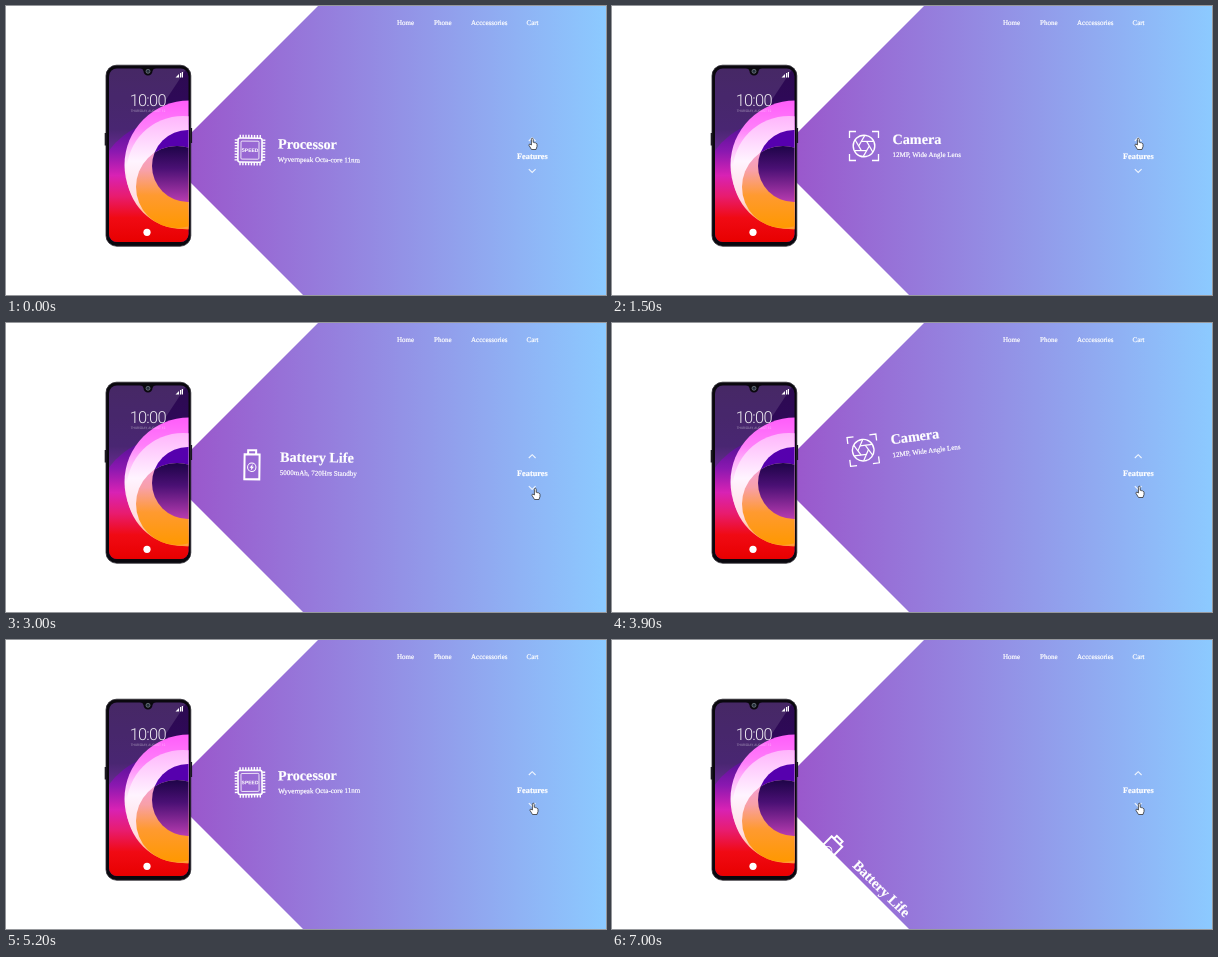
Animation of 600 by 289 pixels, one loop 7.1 s. Source, as an HTML page:

```html
<!DOCTYPE html>
<html lang="en">
<head>
<meta charset="utf-8">
<title>Phone features</title>
<style>
  html, body { margin: 0; width: 100%; height: 100%; overflow: hidden; background: #fff; }
  svg { display: block; width: 600px; height: 289px; }
  text { fill: #fff; stroke: #fff; stroke-width: .2px; font: 7px "Liberation Serif", serif; text-rendering: geometricPrecision; }
  .title { font-size: 14.2px; font-weight: bold; }
  .label { font-size: 8.3px; font-weight: bold; }
  .line { fill: none; stroke: #fff; }
  .clock { font: 300 16.5px Roboto, sans-serif; letter-spacing: -.8px; stroke: none; }
  .tiny { font: 3.3px Roboto, sans-serif; stroke: none; }
  .speed { font: bold 5px "Liberation Sans", sans-serif; stroke: none; }
</style>
</head>
<body>
<svg viewBox="0 0 600 289">
  <defs>
    <linearGradient id="sky" gradientUnits="userSpaceOnUse" x1="160" x2="600" y1="0" y2="0">
      <stop stop-color="#9b51c9"/><stop offset="1" stop-color="#8ccaff"/>
    </linearGradient>
    <linearGradient id="wall" x2="0" y2="1">
      <stop stop-color="#2c0a50"/><stop offset=".35" stop-color="#30085e"/>
      <stop offset=".5" stop-color="#5a0f88"/>
    </linearGradient>
    <linearGradient id="glow" gradientUnits="userSpaceOnUse" x1="0" x2="0" y1="115" y2="236">
      <stop stop-color="#4c0f92"/><stop offset=".25" stop-color="#8a18b0"/>
      <stop offset=".45" stop-color="#d822b4"/><stop offset=".62" stop-color="#e81c70"/>
      <stop offset=".8" stop-color="#f00a14"/><stop offset="1" stop-color="#e80000"/>
    </linearGradient>
    <linearGradient id="outer" x2="0" y2="1">
      <stop stop-color="#ff5cfa"/><stop offset=".22" stop-color="#ff80fa"/>
      <stop offset=".5" stop-color="#fff0fc"/><stop offset=".7" stop-color="#ffd0d8"/>
      <stop offset="1" stop-color="#ff9a30"/>
    </linearGradient>
    <linearGradient id="band" x2="0" y2="1">
      <stop stop-color="#ffb4fc"/><stop offset=".4" stop-color="#fff4ff"/>
      <stop offset=".75" stop-color="#ffdce0"/><stop offset="1" stop-color="#ff9a30"/>
    </linearGradient>
    <linearGradient id="middle" x2="0" y2="1">
      <stop stop-color="#f4a0e0"/><stop offset=".3" stop-color="#f8a0a8"/>
      <stop offset=".6" stop-color="#ff9a30"/><stop offset="1" stop-color="#ff9800"/>
    </linearGradient>
    <linearGradient id="inner" gradientUnits="userSpaceOnUse" x1="0" x2="0" y1="140" y2="196">
      <stop stop-color="#1e0448"/><stop offset=".4" stop-color="#4a1074"/>
      <stop offset="1" stop-color="#b83cb0"/>
    </linearGradient>
    <clipPath id="screen"><rect x="103" y="62.5" width="79.5" height="173.5" rx="8"/></clipPath>
    <clipPath id="overlap"><circle cx="171" cy="181" r="41"/></clipPath>
  </defs>

  <path d="M312 0H600V289H297L160 152Z" fill="url(#sky)"/>
  <text x="391" y="19.3">Home</text>
  <text x="428" y="19.3">Phone</text>
  <text x="465" y="19.3">Acccessories</text>
  <text x="520.5" y="19.3">Cart</text>

  <g id="wheel">
    <g>
      <g class="line">
        <rect x="232" y="131.3" width="24" height="24" rx="2" stroke-width="1.6"/>
        <rect x="235" y="134.3" width="18" height="18" rx="1" stroke-width=".8"/>
        <path d="M233.5 129.5H255M233.5 157H255M230.2 132.5V154M257.8 132.5V154" stroke-width="3" stroke-dasharray="1.4 1.45"/>
      </g>
      <text class="speed" x="244" y="145.1" text-anchor="middle">SPEED</text>
      <text class="title" x="272" y="141.5">Processor</text>
      <text x="272" y="154.6">Wyvernpeak Octa-core 11nm</text>
    </g>
    <g transform="rotate(90 148 140)">
      <g class="line">
        <path d="M237.5 132V125.5H244M260 125.5H266.5V132M266.5 148V154.5H260M244 154.5H237.5V148" stroke-width="1.3"/>
        <circle cx="252" cy="140" r="10.8" stroke-width="1.4"/>
        <g id="blades" stroke-width="1.2"></g>
      </g>
      <text class="title" x="280.5" y="137.5">Camera</text>
      <text x="280.5" y="150.8">12MP, Wide Angle Lens</text>
    </g>
    <g transform="rotate(180 148 140)">
      <g class="line">
        <path d="M238.5 130H253.5V155H238.5ZM242 130V126H250V130" stroke-width="2"/>
        <circle cx="245.8" cy="143" r="4.2" stroke-width="1"/>
      </g>
      <path d="M246.8 139.8L243.6 143.6H245.4L244.8 146.2L248 142.4H246.2Z" fill="#fff"/>
      <text class="title" x="274" y="137">Battery Life</text>
      <text x="274" y="150.3">5000mAh, 720Hrs Standby</text>
    </g>
    <g transform="rotate(-90 148 140)">
      <g class="line">
        <rect x="237.5" y="126" width="17" height="29" rx="2" stroke-width="1.3"/>
        <path d="M239.5 129H252.5V150H239.5ZM241.5 147L250.5 132" stroke-width=".7"/>
        <path d="M244 152.5H248" stroke-width="1.5"/>
      </g>
      <text class="title" x="274" y="138">Display</text>
      <text x="274" y="151">6.5" Mini-Drop Fullscreen</text>
    </g>
  </g>

  <path d="M99.5 127V139.5M185.3 122V137" stroke="#15131c" stroke-width="1.6"/>
  <rect x="100" y="59.2" width="84.8" height="181" rx="10.5" fill="#0a080e" stroke="#2c2a32" stroke-width=".8"/>
  <g clip-path="url(#screen)">
    <rect x="102" y="62" width="81" height="175" fill="url(#wall)"/>
    <path d="M102 62H181L140 124L102 150Z" fill="#fff" opacity=".12"/>
    <path d="M102 146A70 70 0 0 1 183 119V237H102Z" fill="url(#glow)"/>
    <circle cx="183" cy="159" r="64.5" fill="url(#outer)"/>
    <circle cx="177" cy="166.5" r="56.5" fill="url(#band)"/>
    <circle cx="182" cy="160" r="36" fill="#5600ae"/>
    <circle cx="171" cy="181" r="41" fill="url(#middle)"/>
    <circle cx="182" cy="160" r="36" fill="url(#inner)" clip-path="url(#overlap)"/>
  </g>
  <path d="M134 62H150Q147 62.5 146.5 65A4.5 4.5 0 0 1 137.5 65Q137 62.5 134 62Z" fill="#0a080e"/>
  <circle cx="142" cy="65.3" r="2" fill="#25303c" stroke="#7f8790" stroke-width=".7"/>
  <path d="M169.5 71.5L173 68V71.5ZM174 71.5V67H175.2V71.5ZM175.8 71.5V66H177V71.5Z" fill="#fff"/>
  <text class="clock" x="141.7" y="99.8" text-anchor="middle" opacity=".9">10:00</text>
  <text class="tiny" x="142" y="106.4" text-anchor="middle" opacity=".5">THURSDAY, AUGUST 12</text>
  <circle cx="141" cy="226.3" r="3.6" fill="#fff"/>

  <text class="label" x="511" y="152.6">Features</text>
  <path class="line" d="M522.8 135L526.2 131.7L529.6 135M522.8 163.2L526.2 166.5L529.6 163.2" stroke-width="1.1" opacity=".85"/>
  <path id="hand" d="M-1.6 1V-4.6Q-1.6-5.8-.7-5.8T.2-4.6V-1.6Q1-2.3 1.6-1.3Q2.5-1.7 2.9-.7Q4-.8 4 .5V2.5L3 5.5H-1.5L-4 1.4Q-4.2 0-3 .1Z" fill="#fff" stroke="#333" stroke-width=".8"/>
</svg>
<script>
const LOOP = 7100, STEP = 100, TURN = 1000;
const wheel = document.getElementById('wheel');
const hand = document.getElementById('hand');

document.getElementById('blades').innerHTML = [0, 1, 2, 3, 4, 5].map(i =>
  `<path d="M249.3 135.4H261.6" transform="rotate(${i * 60} 252 140)"/>`).join('');

// Each click sends the wheel to a new angle: [time, angle]
const clicks = [[-900, 0], [480, -90], [2120, -180], [3240, -90], [4300, 0], [5380, 90], [6250, 180], [6640, 270]];
const pointer = [[0, 527, 138], [2400, 527, 138], [2900, 530, 171], [3000, 530, 171], [3200, 528, 169], [LOOP, 528, 169]];

// cubic-bezier(.25, .1, .25, 1)
function ease(p) {
  if (p >= 1) return 1;
  let lo = 0, hi = 1, s = .5;
  for (let i = 0; i < 24; i++) {
    s = (lo + hi) / 2;
    if (.75 * s * (1 - s) + s ** 3 < p) lo = s; else hi = s;
  }
  return .3 * s * (1 - s) ** 2 + 3 * s * s * (1 - s) + s ** 3;
}

function angleAt(t) {
  let angle = 90;
  clicks.forEach(([start, target], i) => {
    if (t <= start) return;
    const end = Math.min(t, clicks[i + 1]?.[0] ?? t);
    angle += (target - angle) * ease((end - start) / TURN);
  });
  return angle;
}

function pointerAt(t) {
  const i = pointer.findIndex(p => p[0] > t);
  const [t0, x0, y0] = pointer[i - 1], [t1, x1, y1] = pointer[i];
  const p = (t - t0) / (t1 - t0);
  return [x0 + (x1 - x0) * p, y0 + (y1 - y0) * p];
}

function draw(now) {
  const t = Math.floor(now % LOOP / STEP) * STEP;
  wheel.setAttribute('transform', `rotate(${angleAt(t)} 148 140)`);
  hand.setAttribute('transform', `translate(${pointerAt(t)})`);
}

const begin = performance.now();
function frame() {
  draw(performance.now() - begin);
  requestAnimationFrame(frame);
}
frame();
</script>
</body>
</html>
```
